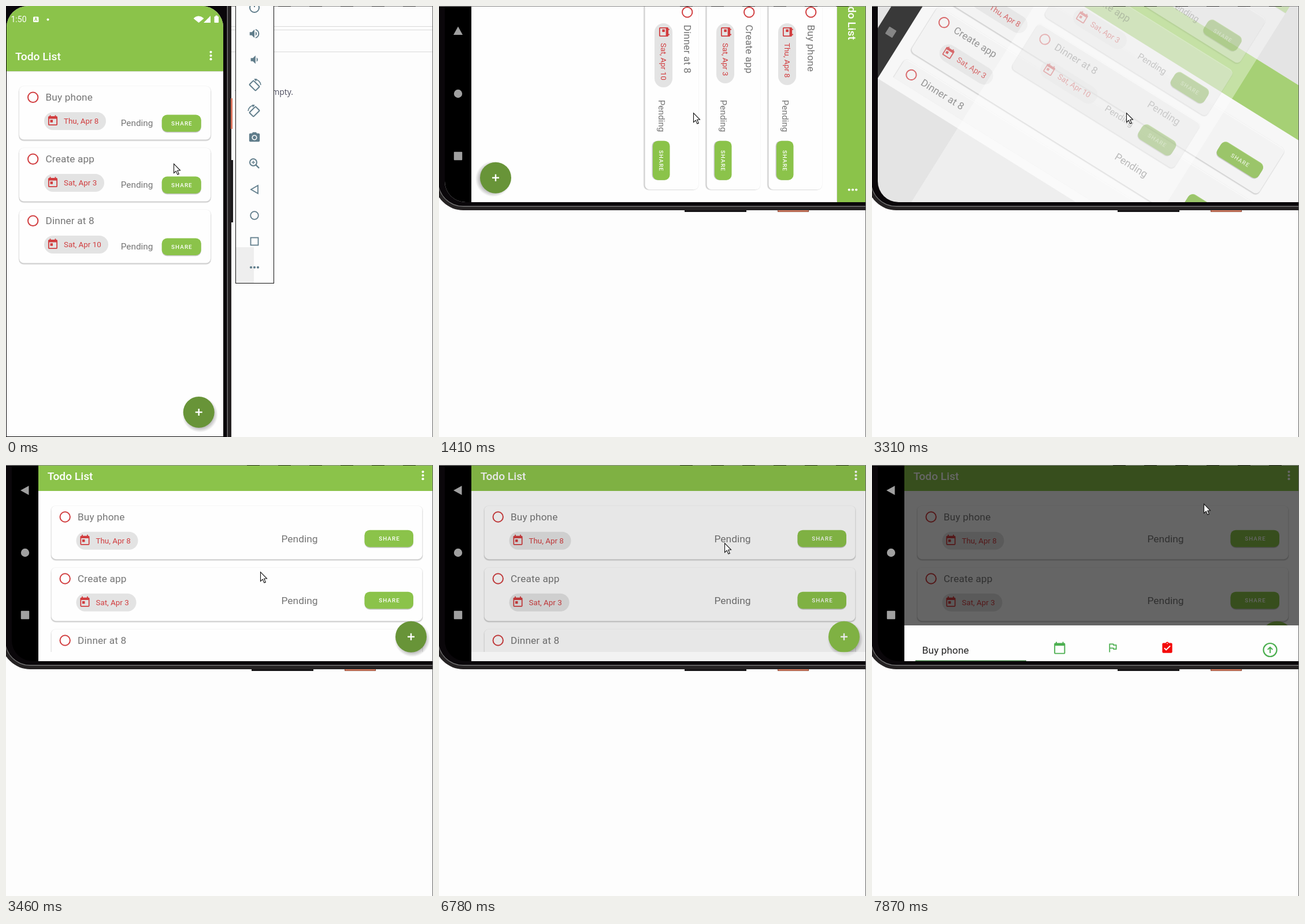
An HTML page with a canvas that plays this animation: 739 by 747 pixels, repeating every 8 s.

```html
<!DOCTYPE html>
<html lang="en">
<head>
<meta charset="utf-8">
<title>Todo List</title>
<style>
html, body { margin: 0; width: 100%; height: 100%; overflow: hidden; background: #fdfdfd; }
canvas { display: block; }
</style>
</head>
<body>
<canvas id="stage" width="739" height="747"></canvas>
<script>
const ctx = document.getElementById('stage').getContext('2d');
const LOOP = 8000;
const GREEN = '#8bc34a', FOCUS = '#689438', RED = '#d13d3f', GREY = '#757575', SLATE = '#607d8b', PAPER = '#fefefe';
const TICKS = [0, 120, 240, 390, 510, 630, 780, 900, 1050, 1170, 1290, 1410, 3190, 3310, 3460,
  4860, 5010, 5130, 5250, 5510, 5650, 6780, 6920, 7070, 7630, 7750, 7870];
const TASKS = [['Buy phone', 'Thu, Apr 8', 107], ['Create app', 'Sat, Apr 3', 104], ['Dinner at 8', 'Sat, Apr 10', 111]];

const ICONS = {
  today: 'M19 3h-1V1h-2v2H8V1H6v2H5a2 2 0 0 0-2 2v14a2 2 0 0 0 2 2h14a2 2 0 0 0 2-2V5a2 2 0 0 0-2-2zm0 16H5V8h14zM7 10h5v5H7z',
  calendar: 'M20 3h-1V1h-2v2H7V1H5v2H4a2 2 0 0 0-2 2v16a2 2 0 0 0 2 2h16a2 2 0 0 0 2-2V5a2 2 0 0 0-2-2zm0 18H4V8h16z',
  flag: 'M12.4 6l.4 2H18v6h-3.4l-.4-2H7V6zM14 4H5v17h2v-7h5.6l.4 2h7V6h-5.6z',
  done: 'M19 3h-4.2a3 3 0 0 0-5.6 0H5a2 2 0 0 0-2 2v14a2 2 0 0 0 2 2h14a2 2 0 0 0 2-2V5a2 2 0 0 0-2-2zm-7 0a1 1 0 0 1 0 2 1 1 0 0 1 0-2zm-2 14l-4-4 1.4-1.4 2.6 2.6 6.6-6.6L18 9z',
  loud: 'M3 9v6h4l5 5V4L7 9zM14 8v8a4.5 4.5 0 0 0 0-8zM14 3.2v2.1a7 7 0 0 1 0 13.4v2.1a9 9 0 0 0 0-17.6z',
  quiet: 'M5 9v6h4l5 5V4L9 9zM16 8v8a4.5 4.5 0 0 0 0-8z',
  camera: 'M9 2L7.2 4H4a2 2 0 0 0-2 2v12a2 2 0 0 0 2 2h16a2 2 0 0 0 2-2V6a2 2 0 0 0-2-2h-3.2L15 2zm3 5a5 5 0 0 1 0 10 5 5 0 0 1 0-10zm0 1.8a3.2 3.2 0 0 0 0 6.4 3.2 3.2 0 0 0 0-6.4z'
};
for (const k in ICONS) ICONS[k] = new Path2D(ICONS[k]);

function scoped(fn) { ctx.save(); fn(); ctx.restore(); }

function rect(x, y, w, h, fill) {
  ctx.fillStyle = fill;
  ctx.fillRect(x, y, w, h);
}

function round(x, y, w, h, r, fill) {
  ctx.beginPath();
  ctx.roundRect(x, y, w, h, r);
  if (fill) { ctx.fillStyle = fill; ctx.fill(); }
}

function disc(x, y, r, fill) {
  ctx.beginPath();
  ctx.arc(x, y, r, 0, 7);
  ctx.fillStyle = fill;
  ctx.fill();
}

function ring(x, y, r, color, width = 2) {
  ctx.beginPath();
  ctx.arc(x, y, r, 0, 7);
  ctx.strokeStyle = color;
  ctx.lineWidth = width;
  ctx.stroke();
}

function poly(points, fill) {
  ctx.beginPath();
  points.forEach(([x, y]) => ctx.lineTo(x, y));
  ctx.closePath();
  if (fill) { ctx.fillStyle = fill; ctx.fill(); }
}

function line(points, color, width) {
  ctx.beginPath();
  points.forEach(([x, y]) => ctx.lineTo(x, y));
  ctx.strokeStyle = color;
  ctx.lineWidth = width;
  ctx.stroke();
}

function text(str, x, y, size, color, weight = 400, gap = 0) {
  ctx.font = `${weight} ${size}px Roboto, sans-serif`;
  ctx.letterSpacing = gap + 'px';
  ctx.fillStyle = color;
  ctx.fillText(str, x, y);
}

function icon(name, cx, cy, size, color) {
  scoped(() => {
    ctx.translate(cx - size / 2, cy - size / 2);
    ctx.scale(size / 24, size / 24);
    ctx.fillStyle = color;
    ctx.fill(ICONS[name], 'evenodd');
  });
}

function card(x, y, w, h) {
  round(x - 1.5, y - .5, w + 3, h + 3.5, 9, 'rgba(0,0,0,.06)');
  round(x - .5, y + 1.5, w + 1, h + .5, 8, 'rgba(0,0,0,.13)');
  round(x, y, w, h, 8, PAPER);
}

function row(task, x, y, lay) {
  const [name, date, chip] = task;
  card(x, y, lay.width, 92.5);
  ring(x + 23.7, y + 19.3, 8.7, RED);
  text(name, x + 45.5, y + 25.3, 17.2, GREY, 400, .16);
  round(x + 43, y + 45, chip, 31, 15.5, '#e3e3e3');
  icon('today', x + 58, y + 60, 21.5, RED);
  text(date, x + 77, y + 65.2, 13.4, RED);
  text('Pending', lay.pendX, y + lay.pendY, lay.pendSize, GREY);
  round(lay.btnX, y + lay.btnY + 1, lay.btnW, 30, 9, 'rgba(0,0,0,.22)');
  round(lay.btnX, y + lay.btnY, lay.btnW, 29.5, 9, GREEN);
  text('SHARE', lay.btnX + lay.btnW / 2 - 17.6, y + lay.btnY + 18.6, 9.8, '#fff', 500, 1.1);
}

function fab(x, y, color) {
  const g = ctx.createRadialGradient(x + 2, y + 4, 23, x + 2, y + 4, 31);
  g.addColorStop(0, 'rgba(0,0,0,.26)');
  g.addColorStop(1, 'rgba(0,0,0,0)');
  disc(x + 2, y + 4, 31, g);
  disc(x, y, 27, color);
  rect(x - 6, y - 1.2, 12, 2.4, '#fff');
  rect(x - 1.2, y - 6, 2.4, 12, '#fff');
}

function bar(titleX, titleY, dotX, dotY) {
  text('Todo List', titleX, titleY, 19.2, '#fff', 500);
  for (const d of [-6.2, 0, 6.2]) disc(dotX, dotY + d, 2.1, '#fff');
}

function navIcons(spots) {
  const [[bx, by], [hx, hy], [rx, ry]] = spots;
  poly([[bx - 8, by], [bx + 6.5, by - 8], [bx + 6.5, by + 8]], '#a0a0a0');
  disc(hx, hy, 7.2, '#a0a0a0');
  round(rx - 7.2, ry - 7.2, 14.4, 14.4, 1, '#a0a0a0');
}

function statusBar() {
  text('1:50', 8.5, 28.3, 14, '#fff');
  round(47, 18.5, 9.5, 9.5, 1.5, '#fff');
  line([[49.7, 26], [51.7, 20.6], [53.7, 26]], GREEN, 1.2);
  disc(72.5, 23.5, 2, '#fff');
  ctx.beginPath();
  ctx.moveTo(333.5, 29);
  ctx.arc(333.5, 29, 11.5, -Math.PI * .78, -Math.PI * .22);
  ctx.fillStyle = '#fff';
  ctx.fill();
  poly([[342, 29], [354, 29], [354, 17]], '#fff');
  round(360.5, 18, 7.5, 11, 1, '#fff');
  rect(362.5, 16.5, 3.5, 2, '#fff');
}

const TALL = { width: 331, pendX: 198.8, pendY: 69, pendSize: 15.3, btnX: 269.7, btnY: 49.5, btnW: 68 };
const WIDE = { width: 642, pendX: 476.5, pendY: 63.5, pendSize: 17.4, btnX: 620.5, btnY: 42, btnW: 84.5 };

function tallScreen() {
  rect(0, -2, 376, 796, PAPER);
  rect(0, -2, 376, 115, GREEN);
  rect(0, 113, 376, 1, 'rgba(0,0,0,.12)');
  statusBar();
  bar(16, 94, 354.5, 86);
  TASKS.forEach((t, i) => row(t, 23, 139 + i * 107, TALL));
  fab(333.7, 704, FOCUS);
  rect(0, 746, 376, 46, '#000');
  navIcons([[79.5, 769], [188, 769], [296, 769]]);
}

function wideScreen(fabColor, dim, sheet) {
  rect(56, -36, 751, 376, PAPER);
  scoped(() => {
    ctx.beginPath();
    ctx.rect(56, 0, 751, 324);
    ctx.clip();
    TASKS.forEach((t, i) => row(t, 78.5, 70.7 + i * 107, WIDE));
  });
  rect(56, -36, 751, 81, GREEN);
  bar(71.7, 26, 721.5, 18);
  fab(701, 297.7, fabColor);
  if (dim) {
    rect(56, -36, 751, 376, `rgba(0,0,0,${dim})`);
    bottomSheet(sheet);
  }
  rect(10, -36, 46, 376, '#000');
  navIcons([[33, 44], [33, 152], [33, 260]]);
}

function bottomSheet({ top, alpha }) {
  scoped(() => {
    ctx.globalAlpha = alpha;
    rect(56, top, 751, 340 - top, PAPER);
    ctx.translate(0, top - 278);
    text('Buy phone', 86.8, 327, 17.2, '#222', 400, .1);
    rect(75, 338.5, 192, 1.5, '#3f7d42');
    icon('calendar', 324.8, 317, 23, '#4caf50');
    icon('flag', 416.5, 316.5, 21, '#4caf50');
    icon('done', 511, 317, 23, '#f40a0a');
    ring(689, 320.5, 11.5, '#4caf50', 2.2);
    line([[689, 326], [689, 316]], '#4caf50', 2);
    line([[684.8, 320], [689, 315.8], [693.2, 320]], '#4caf50', 2);
  });
}

function rotateIcon(cx, cy, dir) {
  scoped(() => {
    ctx.translate(cx, cy);
    ctx.scale(dir, 1);
    scoped(() => {
      ctx.rotate(-Math.PI / 4);
      round(-5, -7.5, 10, 15, 1);
      ctx.strokeStyle = SLATE;
      ctx.lineWidth = 2;
      ctx.stroke();
    });
    ctx.lineWidth = 1.6;
    ctx.beginPath();
    ctx.arc(0, 0, 11, -1.5, -.1);
    ctx.strokeStyle = SLATE;
    ctx.stroke();
    poly([[-1, -11.5], [4, -12], [3, -7]], SLATE);
  });
}

function toolbar() {
  rect(397, -2, 67, 483, '#111');
  rect(398, -2, 65, 482, '#fdfdfd');
  rect(398, 418, 31, 62, '#eee');
  const x = 430;
  ring(x, 3, 8, SLATE);
  rect(x - 1, -8, 2, 10, SLATE);
  icon('loud', x, 48, 22, SLATE);
  icon('quiet', x, 93, 22, SLATE);
  rotateIcon(x, 138, 1);
  rotateIcon(x, 183, -1);
  icon('camera', x, 228, 22, SLATE);
  ring(x - 2, 271, 6, SLATE);
  line([[x + 2.5, 275.5], [x + 8, 281]], SLATE, 2.4);
  line([[x - 5, 271], [x + 1, 271]], SLATE, 1.3);
  line([[x - 2, 268], [x - 2, 274]], SLATE, 1.3);
  poly([[x - 6, 318], [x + 6, 311], [x + 6, 325]]);
  ctx.strokeStyle = SLATE;
  ctx.lineWidth = 1.8;
  ctx.stroke();
  ring(x, 363, 6.8, SLATE, 1.8);
  ctx.strokeRect(x - 6.5, 401.5, 13, 13);
  for (const d of [-6, 0, 6]) disc(x + d, 453, 2.1, SLATE);
}

function topEdge(from) {
  rect(from, 0, 739 - from, 1, '#8a8a8a');
  for (let x = 417; x < 730; x += 54) rect(x, 0, 22, 1, '#333');
  rect(738, 0, 1, 747, '#666');
}

function tallDevice() {
  for (const y of [35, 41, 79]) rect(390, y, 349, 1, '#d9d9d9');
  ctx.font = '14px "Open Sans", sans-serif';
  ctx.letterSpacing = '0px';
  ctx.textAlign = 'right';
  ctx.fillStyle = '#4a4a5c';
  ctx.fillText('folder is empty.', 497, 154);
  ctx.textAlign = 'left';
  rect(0, 0, 390, 747, '#0a070a');
  rect(382.5, 0, 1.5, 747, '#777');
  rect(384, 0, 6, 747, '#252223');
  rect(389, 160, 3, 53, '#d9745c');
  rect(389, 267, 4, 108, '#1c1a1c');
  scoped(() => {
    round(1, 0, 375, 800, 37);
    ctx.clip();
    tallScreen();
  });
  topEdge(390);
  toolbar();
}

function turnAbout(angle, alpha, draw) {
  scoped(() => {
    ctx.globalAlpha = alpha;
    ctx.translate(407, 152);
    ctx.rotate(angle * Math.PI / 180);
    ctx.translate(-407, -152);
    draw();
  });
}

function sideways() {
  scoped(() => {
    ctx.transform(0, 1, -1, 0, 802, -36);
    tallScreen();
  });
}

function wideDevice(draw) {
  rect(425, 350, 107, 7, '#161416');
  rect(586, 350, 54, 7, '#8a4a38');
  rect(587, 353, 52, 3, '#e08468');
  round(-8, -60, 860, 414, 50, '#252223');
  round(-2, -60, 860, 408, 44, '#777');
  round(-1, -60, 860, 406.5, 42.5, '#0a070a');
  scoped(() => {
    round(10, -36, 794, 376, 36);
    ctx.clip();
    draw();
  });
  topEdge(0);
}

function cursor([x, y]) {
  scoped(() => {
    ctx.translate(x + .5, y + .5);
    poly([[0, 0], [0, 16], [3.7, 12.6], [6.3, 18.6], [8.8, 17.6], [6.2, 11.7], [11, 11.3]], '#fff');
    ctx.strokeStyle = '#111';
    ctx.lineWidth = 1.1;
    ctx.stroke();
  });
}

// Smooth progress of t between two moments.
function ease(t, a, b) {
  const p = Math.min(1, Math.max(0, (t - a) / (b - a)));
  return p * p * (3 - 2 * p);
}

function pointer(t) {
  const a = ease(t, 0, 900), b = ease(t, 4730, 5250), c = ease(t, 7500, 7870);
  return [290 + 150 * a + 54 * b + 80 * c, 273 - 88 * a - 50 * b - 68 * c];
}

function screenTurn(t) {
  const first = t < 3310;
  const angle = first ? 5.84 : 58;
  rect(0, -36, 810, 376, '#e4e4e4');
  if (!first) turnAbout(90 - angle, .75, () => wideScreen(FOCUS, 0));
  turnAbout(-angle, first ? 1 : .35, () => {
    ctx.beginPath();
    ctx.rect(10, -36, 794, 376);
    ctx.clip();
    sideways();
    if (first) rect(10, -36, 794, 376, 'rgba(228,228,228,.123)');
  });
}

function draw(t) {
  rect(0, 0, 739, 747, '#fdfdfd');
  if (t < 1170) tallDevice();
  else if (t < 3190) wideDevice(sideways);
  else if (t < 3460) wideDevice(() => screenTurn(t));
  else {
    const fabColor = t < 5510 ? FOCUS : t < 5650 ? '#7aac41' : GREEN;
    const dim = t < 6780 ? 0 : t < 6920 ? .09 : t < 7070 ? .42 : .6;
    const sheet = t < 6920 ? { top: 324, alpha: .5 } : t < 7070 ? { top: 292, alpha: .9 } : { top: 278, alpha: 1 };
    wideDevice(() => wideScreen(fabColor, dim, sheet));
  }
  cursor(pointer(t));
}

const start = performance.now();
let shown = -1;
function frame() {
  const now = (performance.now() - start) % LOOP;
  const tick = TICKS.findLast(v => v <= now) ?? 0;
  if (tick !== shown) draw(shown = tick);
  requestAnimationFrame(frame);
}
draw(0);
requestAnimationFrame(frame);
</script>
</body>
</html>
```
